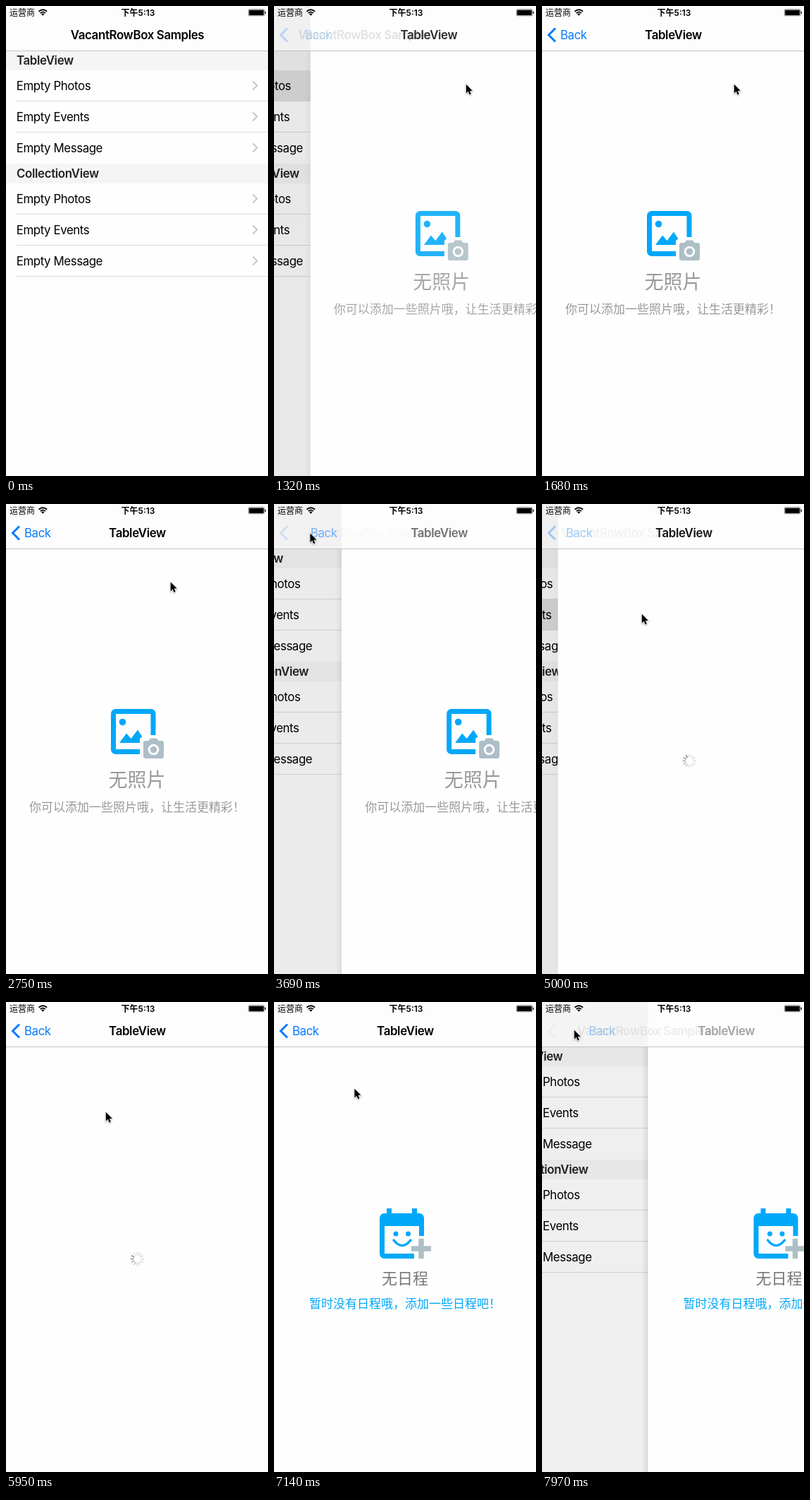
Animation of 372 by 665 pixels, one loop 8000 ms. Source, as an HTML page:

```html
<!DOCTYPE html>
<html lang="zh-CN">
<head>
<meta charset="utf-8">
<title>Empty states</title>
<style>
  html, body { margin: 0; width: 100%; height: 100%; overflow: hidden; background: #fefefe; }
  svg { display: block; width: 372px; height: 665px; }
  text { font: 400 16.86px Inter, "Noto Sans CJK SC", "Noto Sans CJK", sans-serif; letter-spacing: -.42px; }
  .bold { font-weight: 600; letter-spacing: -.36px; }
  .mid { text-anchor: middle; }
  .cn { font-family: "Noto Sans CJK SC", "Noto Sans CJK", sans-serif; font-weight: 300; letter-spacing: 0; text-anchor: middle; }
  .status { font-size: 12px; letter-spacing: 0; }
  .blue { fill: #00a8f9; }
  .frame { fill: none; stroke: #00a8f9; stroke-width: 7; }
  .gray { fill: #adbec6; }
  .paper { fill: #fefefe; }
</style>
</head>
<body>
<svg viewBox="0 0 372 665">
  <defs>
    <linearGradient id="edge"><stop stop-opacity="0"/><stop offset="1" stop-opacity=".1"/></linearGradient>
  </defs>
  <rect class="paper" width="372" height="665"/>
  <g id="list"></g>
  <rect id="dim" y="63" width="372" height="602"/>

  <g id="page">
    <rect id="shadow" x="-9" y="63" width="9" height="602" fill="url(#edge)"/>
    <rect class="paper" y="63" width="372" height="602"/>
    <g id="photos">
      <rect class="frame" x="152.5" y="293.5" width="56.5" height="57" rx="3"/>
      <circle class="blue" cx="165.500" cy="308.500" r="4.800"/>
      <path class="blue" d="M161 338L171 324.500L177.500 332L187 319.500L199 338Z"/>
      <path class="paper" d="M190 356V332L196 327H226V363H190Z"/>
      <path class="gray" d="M198 335H202.500L205 331.500H214L216.500 335H221Q224 335 224 338V357Q224 360 221 360H198Q195 360 195 357V338Q195 335 198 335Z"/>
      <circle class="gray" cx="209.500" cy="347.500" r="6.300" stroke="#fefefe" stroke-width="3"/>
      <text class="cn" x="186" y="400" fill="#999" style="font-size:27px">无照片</text>
      <text class="cn" x="186" y="435" fill="#999" style="font-size:17px">你可以添加一些照片哦，让生活更精彩！</text>
    </g>
    <g id="events">
      <rect class="frame" x="153.500" y="302.500" width="56" height="57" rx="3"/>
      <path class="blue" d="M160 292H167V301H160ZM196 292H203V301H196ZM152 302H211V317H152Z"/>
      <circle class="blue" cx="173" cy="328" r="3.500"/>
      <circle class="blue" cx="190.500" cy="328" r="3.500"/>
      <path d="M170 337Q182 352 194 337" fill="none" stroke="#00a8f9" stroke-width="3.500" stroke-linecap="round"/>
      <path class="paper" d="M199 341H202V331H216V341H226V366H199Z"/>
      <path class="gray" d="M205.300 335H212.700V345.300H223V352.700H212.700V363H205.300V352.700H195V345.300H205.300Z"/>
      <text class="cn" x="186" y="399" fill="#777" style="font-size:22px">无日程</text>
      <text class="cn blue" x="186" y="433" style="font-size:17px">暂时没有日程哦，添加一些日程吧！</text>
    </g>
    <g id="spinner" transform="translate(186.500 363.500)" stroke="#959595" stroke-width="1.800" stroke-linecap="round"></g>
  </g>

  <rect width="372" height="63" fill="#fdfdfd"/>
  <rect id="tint" height="63"/>
  <path d="M0 63.500H372" stroke="#c2c2c2"/>
  <text id="home" class="bold mid" x="186.500" y="47">VacantRowBox Samples</text>
  <text id="title" class="bold mid" x="186.500" y="47">TableView</text>
  <path id="arrow" d="M19 31.500L9.500 41L19 50.500" fill="none" stroke="#0a7cff" stroke-width="3"/>
  <text id="back" x="26" y="47" fill="#0a7cff">Back</text>

  <text class="status" x="5" y="14">运营商</text>
  <path d="M46.500 7.800Q52.300 2.800 58.100 7.800M48.700 10.200Q52.300 7 55.900 10.200" fill="none" stroke="#000" stroke-width="1.800"/>
  <path d="M50.100 11.500Q52.300 9.700 54.500 11.500L52.300 13.800Z"/>
  <text class="status bold mid" x="187.500" y="14" style="letter-spacing:0">下午5:13</text>
  <rect x="344.300" y="4.800" width="22.400" height="9" rx="1.500" fill="none" stroke="#000" stroke-width=".5"/>
  <rect x="345.200" y="5.700" width="20.600" height="7.200" rx=".6"/>
  <rect x="367.500" y="7.500" width="1.300" height="3.500" rx=".6"/>

  <path id="cursor" d="M.8 .8V13.600L3.700 10.800L5.700 15.400L7.800 14.500L5.900 10H9.900Z" stroke="#fff" stroke-width="1.200"
    paint-order="stroke" style="filter:drop-shadow(0 1px 1px rgba(0,0,0,.35))"/>
</svg>
<script>
const LOOP = 8000, STEP = 118.7, FIRST = 485, WIDTH = 372;
const visits = [
  { push: 1130, pop: 3640, row: 91 },
  { push: 4753, pop: 7891, row: 135 }
];
// time, x, y of the pointer tip
const path = [
  [485, 323, 97], [960, 272, 110], [2147, 272, 110], [2505, 270, 112], [2630, 270, 112],
  [2740, 234, 110], [3452, 50, 40], [3690, 50, 40], [4165, 122, 140], [4284, 128, 144],
  [4520, 141, 155], [6900, 141, 155], [7726, 45, 39], [8000, 45, 39]
];
const $ = id => document.getElementById(id);
const clamp = v => Math.max(0, Math.min(1, v));
const shift = (id, x, y = 0) => $(id).setAttribute('transform', `translate(${x} ${y})`);
const fade = (id, a) => $(id).setAttribute('opacity', a);

function section(name, y) {
  let out = `<rect y="${y}" width="372" height="28" fill="#f5f5f5"/>
    <text class="bold" x="15" y="${y + 20}" fill="#222">${name}</text>`;
  ['Photos', 'Events', 'Message'].forEach((item, i) => {
    const top = y + 28 + i * 44;
    out += `<text x="14.700" y="${top + 27.5}">Empty ${item}</text>
      <path d="M350.500 ${top + 15.5}l6 6l-6 6" fill="none" stroke="#c7c7cc" stroke-width="2"/>`;
    if (i < 2 || y > 200) out += `<path d="M15 ${top + 43.5}H372" stroke="#dcdcdc"/>`;
  });
  return out;
}
$('list').innerHTML = '<rect id="pick" width="372" height="44" fill="#e0e0e0"/>' +
  section('TableView', 63) + section('CollectionView', 223);
$('spinner').innerHTML = Array.from({ length: 12 }, (_, i) =>
  `<path d="M0 -5.700V-9" transform="rotate(${i * 30})"/>`).join('');
const blades = [...$('spinner').children];

// critically damped spring: 1 at the start, falling to 0
function spring(ms) {
  if (ms <= 0) return 1;
  if (ms > 520) return 0;
  const u = ms * .01826;
  return (1 + u) * Math.exp(-u);
}

function drawPointer(t) {
  const i = path.findIndex(p => p[0] > t);
  fade('cursor', i > 0 ? 1 : 0);
  if (i < 1) return;
  const [t0, x0, y0] = path[i - 1], [t1, x1, y1] = path[i];
  const k = (t - t0) / (t1 - t0);
  shift('cursor', x0 + (x1 - x0) * k, y0 + (y1 - y0) * k);
}

function drawBar(t, { push, pop }) {
  const leaving = t > pop;
  const q = leaving ? 1 - spring(t - pop) : spring(t - push - 18);
  const shown = leaving ? (1 - q) ** 2 : clamp((t - push) / 500) ** 1.5;
  const pressed = !leaving && t > pop - 170 ? .3 : 1;
  shift('title', 186 * q);
  shift('home', -70 * (1 - q));
  shift('back', 100 * q);
  fade('title', leaving ? shown : 1 - q);
  fade('home', leaving ? q ** 3 : q ** 1.3);
  fade('back', shown * pressed);
  fade('arrow', (leaving ? shown ** 3 : shown) * pressed);
}

function draw(ms) {
  // the screen refreshes in steps
  const t = FIRST + Math.floor((ms - FIRST) / STEP) * STEP + 4;
  const second = t > 4500, visit = visits[+second];
  const off = t > visit.pop ? 1 - spring(t - visit.pop) : spring(t - visit.push);

  shift('list', -.3 * WIDTH * (1 - off));
  shift('page', off * WIDTH);
  fade('dim', .1 * (1 - off));
  fade('shadow', clamp(off * 2.5));
  $('tint').setAttribute('width', off * WIDTH);
  fade('tint', .06 * (1 - off));
  $('pick').setAttribute('y', visit.row);
  fade('pick', t > visit.push && t < visit.pop ? 1 : 0);

  fade('photos', second ? 0 : clamp((t - 1130) / 220));
  fade('events', second ? clamp((t - 6340) / 300) : 0);
  fade('spinner', second && t < 6400 ? 1 : 0);
  fade('page', off < 1 ? 1 : 0);
  const head = Math.floor((t - 60) * .012);
  blades.forEach((b, i) => {
    const lag = (head - i + 1200) % 12;
    b.setAttribute('opacity', Math.max(.27, 1 - lag * .15));
  });

  drawBar(t, visit);
  drawPointer(t);
}

const start = performance.now();
function tick() {
  draw((performance.now() - start) % LOOP);
  requestAnimationFrame(tick);
}
tick();
</script>
</body>
</html>
```
